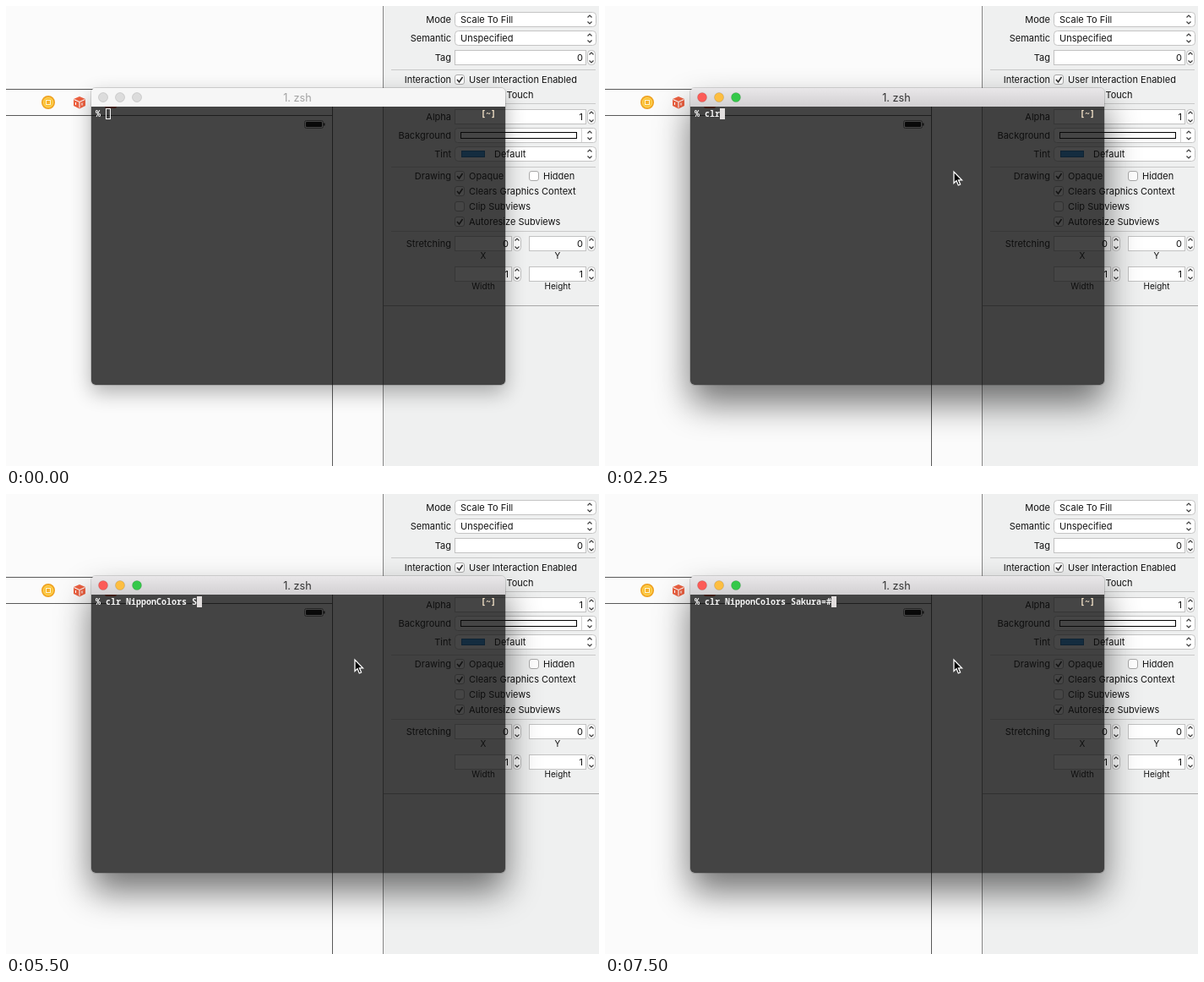
Write an HTML page that moves like this. It is 702 by 544 pixels and loops after 8 s.

```html
<!DOCTYPE html>
<html lang="en">
<head>
<meta charset="utf-8">
<title>Terminal over inspector</title>
<style>
  html, body { margin: 0; width: 100%; height: 100%; overflow: hidden; background: #fbfbfb; }
  svg { display: block; width: 702px; height: 544px; }
  text { font-family: Inter, Roboto, sans-serif; font-size: 11px; fill: #111; white-space: pre; }
  .title { font-size: 12.7px; }
  .mono { font-family: "Noto Sans Mono", "DejaVu Sans Mono", monospace; font-size: 10px; font-weight: 600; fill: #f4f4f4; }
  .small { font-size: 10px; }
</style>
</head>
<body>
<svg viewBox="0 0 702 544" xmlns="http://www.w3.org/2000/svg">
  <defs>
    <clipPath id="pane"><path d="M101 119H591V443a5 5 0 0 1-5 5H106a5 5 0 0 1-5-5Z"/></clipPath>
    <linearGradient id="chrome" x2="0" y2="1">
      <stop offset="0" stop-color="#e9e7e9"/><stop offset="1" stop-color="#d2d0d2"/>
    </linearGradient>
    <filter id="soft" x="0" y="0" width="702" height="544" filterUnits="userSpaceOnUse"><feGaussianBlur stdDeviation=".5"/></filter>
    <filter id="shadowOff" x="0" y="0" width="702" height="544" filterUnits="userSpaceOnUse"><feGaussianBlur stdDeviation="12"/></filter>
    <filter id="shadowOn" x="0" y="0" width="702" height="544" filterUnits="userSpaceOnUse"><feGaussianBlur stdDeviation="21"/></filter>
  </defs>

  <g id="desk">
    <rect width="702" height="544" fill="#fbfbfb"/>
    <path d="M0 98.5H386.5V544M0 129.5H386" fill="none" stroke="#585858"/>
    <circle cx="50" cy="114" r="7.3" fill="#fbc02d" stroke="#ee9f22" stroke-width="1.4"/>
    <circle cx="50" cy="114" r="5.4" fill="none" stroke="#fdd876" stroke-width=".8"/>
    <rect x="47.5" y="111.5" width="5" height="5" fill="#f7b02a" stroke="#fff4d6"/>
    <path d="M87 107l7 3v8l-7 3.500l-7-3.500v-8Z" fill="#ee6141"/>
    <path d="M80.500 110.500l6.500 3l6.500-3M87 113.500v7M82.500 114v3M90 114.500v3" fill="none" stroke="#fff" stroke-width="1.100"/>
    <rect x="117" y="107" width="14" height="14" rx="2" fill="#e0573a"/>
    <rect x="353.500" y="135.500" width="22" height="9" rx="2" fill="none" stroke="#777"/>
    <rect x="355" y="137" width="19" height="6" rx="1"/>
    <rect x="376" y="138.500" width="1.500" height="3" fill="#222"/>
    <rect x="447" width="255" height="544" fill="#eff0f0"/>
    <path d="M446.500 0V544" stroke="#858585"/>
    <path d="M447 354.500H702" stroke="#a8a8a8"/>
    <g id="inspector"></g>
  </g>

  <rect id="shadow" x="101" y="97" width="490" height="351" rx="5"/>
  <rect x="100.500" y="96.500" width="491" height="352" rx="5.500" fill="none" stroke="#000" opacity=".14"/>
  <g clip-path="url(#pane)">
    <use href="#desk" filter="url(#soft)"/>
    <rect x="101" y="119" width="490" height="329" fill="#0c0c0c" opacity=".765"/>
  </g>
  <path id="bar" d="M101 119V102a5 5 0 0 1 5-5H586a5 5 0 0 1 5 5V119Z"/>
  <g id="lights"></g>
  <text id="caption" class="title" x="345" y="113" text-anchor="middle">1. zsh</text>

  <text class="mono" x="106" y="131">%</text>
  <text id="command" class="mono" x="118" y="131"></text>
  <text class="mono" x="562" y="131" style="fill:#fdebd0;font-weight:700">[~]</text>
  <rect id="caret" y="121.500" width="5" height="12"/>
  <path id="pointer" d="M0 0V13.500L3 10.600L5.300 16L7.600 15L5.400 9.800H9.500Z" fill="#000" stroke="#fff" stroke-width="1.300"/>
</svg>

<script>
const LOOP = 8000;
const COMMAND = 'clr NipponColors Sakura=#';
const FOCUS_AT = 1000;

// [time, characters typed]
const TYPING = [
  [0, 0], [2000, 1], [2250, 3], [2500, 4], [3000, 5], [3250, 7], [3500, 8],
  [3750, 10], [4000, 11], [4250, 12], [4500, 14], [4750, 15], [5000, 17],
  [5500, 18], [5750, 20], [6000, 23], [6750, 24], [7250, 25]
];
// [time, pointer tip]
const POINTER = [[0, null], [250, [494, 79]], [500, [416, 186]], [750, [413, 196]]];
const LIGHTS = ['#fc5b57', '#fdbe41', '#35c84a'];

const byId = id => document.getElementById(id);
const inspector = byId('inspector');

function add(parent, tag, attrs, content = '') {
  const node = document.createElementNS('http://www.w3.org/2000/svg', tag);
  for (const key in attrs) node.setAttribute(key, attrs[key]);
  node.textContent = content;
  parent.append(node);
  return node;
}
const label = (x, y, content, anchor = 'start', cls = '') =>
  add(inspector, 'text', { x, y, 'text-anchor': anchor, class: cls }, content);
const rowLabel = (y, content) => label(527, y, content, 'end');
const stroke = (d, color, width = 1) =>
  add(inspector, 'path', { d, fill: 'none', stroke: color, 'stroke-width': width });
const box = (x, y, width, height, fill, edge, rx = 0) =>
  add(inspector, 'rect', { x: x + .5, y: y + .5, width: width - 1, height: height - 1, rx, fill, stroke: edge });
const divider = y => stroke(`M456 ${y}.5H698`, '#c9c9c9');

function arrows(x, y, reach = 3) {
  stroke(`M${x - 2.5} ${y - reach + .5}l2.500-2.500l2.500 2.500M${x - 2.5} ${y + reach - .5}l2.500 2.500l2.500-2.500`, '#3c3c3c', 1.2);
}
function popup(y, content, textX = 538) {
  box(531, y, 168, 18, '#fff', '#c4c4c4', 4);
  label(textX, y + 13, content);
  arrows(691, y + 9);
}
function numberField(x, y, width, value) {
  box(x, y, width, 18, '#fff', '#c2c2c2');
  label(x + width - 4, y + 13, value, 'end');
  box(x + width + 1, y, 10, 18, '#fff', '#bdbdbd', 4);
  arrows(x + width + 6, y + 9, 4);
}
function checkbox(x, y, content, checked) {
  box(x, y, 12, 12, '#fff', '#a9a9a9', 2.5);
  if (checked) stroke(`M${x + 3} ${y + 6}l2.500 3l4-6`, '#2c2c2c', 1.6);
  label(x + 17, y + 10, content);
}

function buildInspector() {
  rowLabel(20, 'Mode');
  popup(7, 'Scale To Fill');
  rowLabel(42, 'Semantic');
  popup(29, 'Unspecified');
  rowLabel(65, 'Tag');
  numberField(531, 52, 156, '0');
  divider(75);

  rowLabel(91, 'Interaction');
  checkbox(531, 81, 'User Interaction Enabled', true);
  checkbox(531, 99, 'Multiple Touch', false);
  divider(115);

  rowLabel(135, 'Alpha');
  numberField(531, 122, 156, '1');
  rowLabel(157, 'Background');
  box(531, 144, 168, 18, '#fff', '#c4c4c4', 3);
  box(538, 149, 138, 8, '#fff', '#000');
  stroke('M681.500 145V161', '#d0d0d0');
  arrows(691, 153);
  rowLabel(179, 'Tint');
  popup(166, 'Default', 578);
  box(539, 171, 28, 8, '#2f96e6', '#1b6fb4');
  divider(190);

  rowLabel(205, 'Drawing');
  checkbox(531, 195, 'Opaque', true);
  checkbox(619, 195, 'Hidden', false);
  checkbox(531, 213, 'Clears Graphics Context', true);
  checkbox(531, 231, 'Clip Subviews', false);
  checkbox(531, 249, 'Autoresize Subviews', true);
  divider(266);

  rowLabel(285, 'Stretching');
  [[272, '0', 'X', 'Y'], [308, '1', 'Width', 'Height']].forEach(([y, value, left, right]) => {
    numberField(531, y, 68, value);
    numberField(619, y, 68, value);
    label(565, y + 27, left, 'middle', 'small');
    label(653, y + 27, right, 'middle', 'small');
  });
}

const lights = LIGHTS.map((_, i) =>
  add(byId('lights'), 'circle', { cx: 115 + 20 * i, cy: 108, r: 5.5, stroke: '#000', 'stroke-opacity': .12 }));

function set(node, attrs) {
  for (const key in attrs) node.setAttribute(key, attrs[key]);
}
const at = (steps, t) => steps.filter(([start]) => start <= t).pop()[1];

function draw(t) {
  const active = t >= FOCUS_AT;
  set(byId('shadow'), active
    ? { transform: 'translate(0 22)', opacity: .54, filter: 'url(#shadowOn)' }
    : { transform: 'translate(0 9)', opacity: .3, filter: 'url(#shadowOff)' });
  set(byId('bar'), { fill: active ? 'url(#chrome)' : '#f6f6f6' });
  byId('caption').style.fill = active ? '#333' : '#a3a3a3';
  lights.forEach((light, i) => set(light, { fill: active ? LIGHTS[i] : '#dcdcdc' }));

  const typed = at(TYPING, t);
  byId('command').textContent = COMMAND.slice(0, typed);
  set(byId('caret'), { x: 118.5 + 6 * typed, fill: active ? '#e2dede' : 'none', stroke: active ? '#e2dede' : '#f4f4f4' });

  const tip = at(POINTER, t);
  set(byId('pointer'), tip
    ? { visibility: 'visible', transform: `translate(${tip[0]} ${tip[1]})` }
    : { visibility: 'hidden' });
}

buildInspector();
const start = performance.now();
function tick() {
  draw((performance.now() - start) % LOOP);
  requestAnimationFrame(tick);
}
tick();
</script>
</body>
</html>
```
